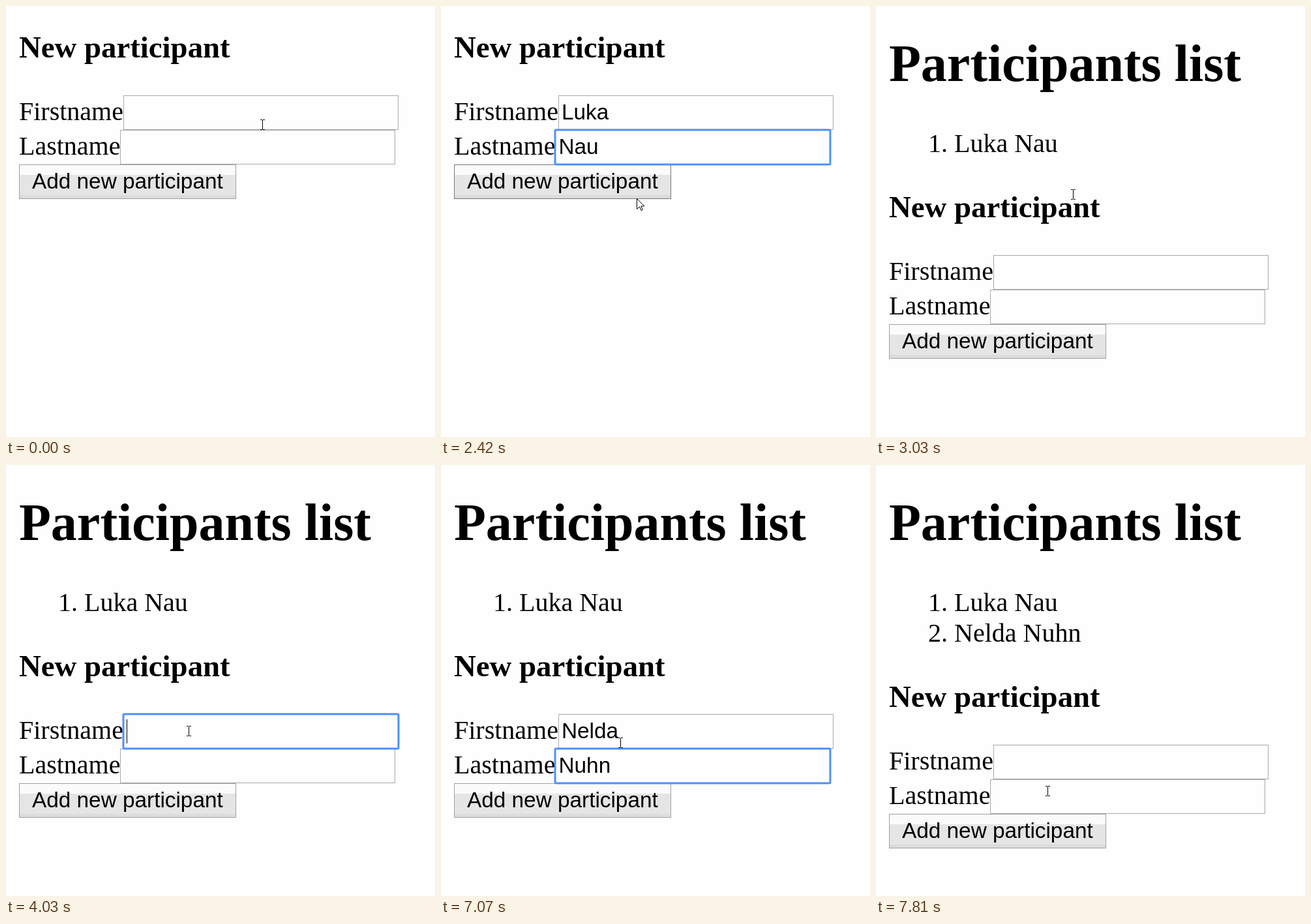
These frames come from a looping animation (658x661 px, 8 s). An HTML page with a canvas:

```html
<!DOCTYPE html>
<html lang="en">
<head>
<meta charset="utf-8">
<title>Participants</title>
<style>
  html, body { margin: 0; height: 100%; overflow: hidden; background: #fefefe; }
  canvas { display: block; }
</style>
</head>
<body>
<canvas id="stage" width="658" height="661"></canvas>
<script>
const ctx = document.getElementById('stage').getContext('2d');
const LOOP = 8000;
const SERIF = '"Liberation Serif", "Times New Roman", serif';
const SANS = '"Liberation Sans", Arial, sans-serif';
const PEOPLE = ['Luka Nau', 'Nelda Nuhn'];
const FORM_TOP = [0, 245, 292];

// Each step changes part of the state from its time on.
const steps = [
  [0, { count: 0, focus: '', first: '', last: '', caret: false, pointer: 'beam', at: [393, 182], button: '' }],
  [80, { focus: 'first', caret: true }],
  [540, { caret: false }],
  [700, { first: 'L', caret: true }],
  [850, { first: 'Lu' }],
  [910, { first: 'Luk' }],
  [1140, { first: 'Luka', focus: 'last' }],
  [1530, { last: 'N' }],
  [1670, { last: 'Na' }],
  [1750, { last: 'Nau' }],
  [2210, { at: [366, 213] }],
  [2280, { caret: false, pointer: 'arrow', at: [335, 262], button: 'hover' }],
  [2350, { at: [314, 281] }],
  [2420, { at: [300, 295] }],
  [2730, { at: [302, 289], caret: true }],
  [2800, { focus: '', button: 'down' }],
  [2870, { button: 'hover' }],
  [3030, { count: 1, first: '', last: '', caret: false, pointer: 'beam', button: '' }],
  [3600, { at: [299, 306] }],
  [3660, { at: [292, 358] }],
  [3720, { at: [286, 391] }],
  [3870, { at: [282, 402] }],
  [3950, { at: [280, 408] }],
  [4030, { focus: 'first', caret: true }],
  [4580, { first: 'N' }],
  [4630, { first: 'Ne' }],
  [4770, { first: 'Nel' }],
  [4860, { first: 'Neld' }],
  [5090, { first: 'Nelda' }],
  [5230, { focus: 'last' }],
  [5690, { last: 'u' }],
  [6000, { last: '' }],
  [6160, { last: 'N' }],
  [6310, { last: 'Nu' }],
  [6450, { last: 'Nuh' }],
  [6530, { last: 'Nuhn' }],
  [7070, { at: [275, 426], caret: false }],
  [7140, { at: [271, 448] }],
  [7210, { at: [267, 474] }],
  [7280, { pointer: 'arrow', at: [264, 492], button: 'hover' }],
  [7350, { at: [263, 498] }],
  [7430, { at: [263, 500] }],
  [7500, { focus: '', button: 'down' }],
  [7570, { button: 'hover' }],
  [7810, { count: 2, first: '', last: '', pointer: 'beam', button: '' }]
];

function stateAt(time) {
  return Object.assign({}, ...steps.filter(([start]) => start <= time).map(step => step[1]));
}

function text(string, x, y, font) {
  ctx.font = font;
  ctx.fillStyle = '#000';
  ctx.fillText(string, x, y);
}

function rect(color, x, y, w, h) {
  ctx.fillStyle = color;
  ctx.fillRect(x, y, w, h);
}

function frame(color, x, y, w, h) {
  ctx.strokeStyle = color;
  ctx.lineWidth = 1;
  ctx.strokeRect(x + 0.5, y + 0.5, w - 1, h - 1);
}

function drawField(label, x, y, value) {
  text(label, 20, y + 38, `40px ${SERIF}`);
  frame('#a9a9a9', Math.floor(x), y, 422, 53);
  text(value, x + 5, y + 37, `33.333px ${SANS}`);
}

function drawFocus(x, y, value, caret) {
  ctx.strokeStyle = '#4d90fe';
  ctx.lineWidth = 3;
  ctx.beginPath();
  ctx.roundRect(Math.floor(x), y, 422, 53, 1.5);
  ctx.stroke();
  if (!caret) return;
  ctx.font = `33.333px ${SANS}`;
  // The caret sits one pixel lower in an empty field.
  rect('#000', Math.floor(x + 5 + ctx.measureText(value).width), y + (value ? 7 : 8), 1, 37);
}

function drawButton(y, mode) {
  const down = mode === 'down';
  rect(down ? '#e4e4e4' : '#fbfbfb', 20, y, 333, 16);
  rect(down ? '#dcdcdc' : '#e5e5e5', 20, y + 16, 333, 31);
  rect(down ? '#e4e4e4' : '#dcdcdc', 20, y + 47, 333, 6);
  frame(mode ? '#777' : '#a0a0a0', 20, y, 333, 53);
  text('Add new participant', 40, y + 37, `33.333px ${SANS}`);
}

function drawPointer(kind, x, y) {
  if (kind === 'beam') {
    rect('#000', x, y - 7, 1, 14);
    for (const edge of [y - 8, y + 7]) {
      rect('#000', x - 3, edge, 3, 1);
      rect('#000', x + 1, edge, 3, 1);
    }
    return;
  }
  const arrow = new Path2D('M.5 .5V16.5L4.5 12.8 7 18.5 9.3 17.5 6.8 12H11.8Z');
  ctx.save();
  ctx.translate(x, y);
  ctx.fillStyle = '#fff';
  ctx.fill(arrow);
  ctx.strokeStyle = '#000';
  ctx.lineWidth = 1;
  ctx.stroke(arrow);
  ctx.restore();
}

function draw(s) {
  rect('#fefefe', 0, 0, 658, 661);
  const top = FORM_TOP[s.count];
  if (s.count) text('Participants list', 20, 115, `bold 80px ${SERIF}`);
  PEOPLE.slice(0, s.count).forEach((name, i) =>
    text(`${i + 1}. ${name}`, 80, 224 + 47 * i, `40px ${SERIF}`));
  text('New participant', 20, top + 79, `bold 46.8px ${SERIF}`);

  const fields = { first: [180, top + 137], last: [175.5, top + 190] };
  drawField('Firstname', ...fields.first, s.first);
  drawField('Lastname', ...fields.last, s.last);
  drawButton(top + 243, s.button);
  if (s.focus) drawFocus(...fields[s.focus], s[s.focus], s.caret);
  drawPointer(s.pointer, ...s.at);
}

function tick() {
  draw(stateAt(performance.now() % LOOP));
  requestAnimationFrame(tick);
}
tick();
</script>
</body>
</html>
```
